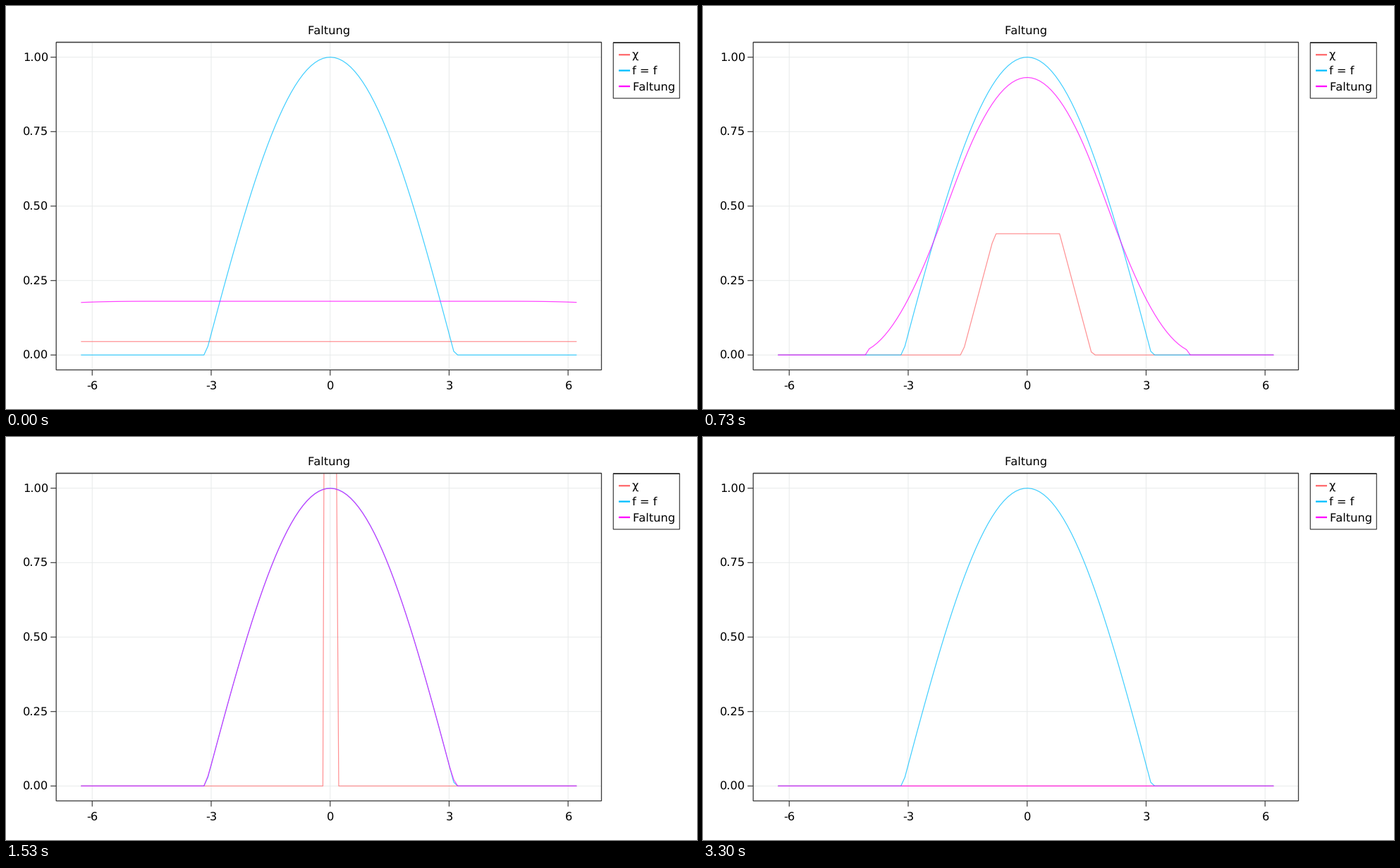
Animation of 980 by 572 pixels, one loop 3360 ms. Source, as a matplotlib script:

```python
import numpy as np
import matplotlib.pyplot as plt
from matplotlib.animation import FuncAnimation
from matplotlib.lines import Line2D

W, H, DPI = 980, 572, 100
LOOP, INTERVAL = 3360, 20
LEFT, RIGHT, TOP, BOTTOM = 71.2, 844.5, 51.5, 516.5
PX = 72 / DPI
RED, BLUE, MAGENTA = (1, 0.42, 0.43), (0, 0.75, 1), (1, 0, 1)
DARK, GRID = "#3c3c3c", "#e8ebeb"

plt.rcParams["font.family"] = "DejaVu Sans"
plt.rcParams["font.size"] = 16.2 * PX
plt.rcParams["text.hinting"] = "none"
plt.rcParams["text.kerning_factor"] = 6

x = -2 * np.pi + 0.1 * np.arange(126)

# Nodes of the 15-point Kronrod rule, on one interval and after one bisection
HALF = np.array([0.2077849550, 0.4058451514, 0.5860872355, 0.7415311856,
                 0.8648644234, 0.9491079123, 0.9914553711])
KRONROD = np.concatenate([-HALF, [0], HALF])
SPLIT = np.concatenate([(KRONROD - 1) / 2, (KRONROD + 1) / 2])


def bump(u):
    return np.where(np.abs(u) < np.pi, np.cos(u / 2), 0)


def bump_twice_integrated(u):
    inner = 2 * u + 2 * np.pi - 4 * np.cos(u / 2)
    return np.where(u < -np.pi, 0, np.where(u > np.pi, 4 * u, inner))


def trapezoid(u, eps):
    return np.clip(2 - np.abs(u) / eps, 0, 1) / (3 * eps)


def sampled(nodes, eps):
    """True where the quadrature over the real line meets a nonzero integrand."""
    y = nodes / (1 - nodes ** 2)
    y = y[np.abs(y) < 2 * eps]
    return (np.abs(x[:, None] - y) < np.pi).any(axis=1)


def convolution(eps):
    g = bump_twice_integrated
    exact = (g(x + 2 * eps) - g(x + eps) - g(x - eps) + g(x - 2 * eps)) / (3 * eps ** 2)
    return np.where(sampled(KRONROD, eps) & sampled(SPLIT, eps), exact, 0)


fig = plt.figure(figsize=(W / DPI, H / DPI), dpi=DPI, facecolor="white")
ax = fig.add_axes([LEFT / W, 1 - BOTTOM / H, (RIGHT - LEFT) / W, (BOTTOM - TOP) / H])
ax.set_xlim(x[0] - 0.625, x[-1] + 0.625)
ax.set_ylim(-0.05, 1.05)
ax.axis("off")


def stroke(xs, ys, color, width, zorder=2):
    """Polyline in stage pixels, measured from the top left."""
    fig.add_artist(Line2D(np.array(xs) / W, 1 - np.array(ys) / H, color=color,
                          linewidth=width * PX, solid_capstyle="butt",
                          solid_joinstyle="miter", snap=False, zorder=zorder))


def box(x0, y0, x1, y1, width):
    stroke([x0, x1, x1, x0, x0, x1], [y0, y0, y1, y1, y0, y0], DARK, width)


def label(px, py, text, ha="left"):
    fig.text(px / W, 1 - py / H, text, ha=ha, va="baseline", color="black")


def x_pixel(v):
    lo, hi = ax.get_xlim()
    return LEFT + (v - lo) / (hi - lo) * (RIGHT - LEFT)


def y_pixel(v):
    lo, hi = ax.get_ylim()
    return BOTTOM - (v - lo) / (hi - lo) * (BOTTOM - TOP)


# Axes frame, grid and labels
for v in (-6, -3, 0, 3, 6):
    px = x_pixel(v)
    stroke([px, px], [TOP, BOTTOM], GRID, 1, zorder=-1)
    stroke([px, px], [BOTTOM, BOTTOM + 8], DARK, 1.2)
    label(px + 0.5, 545, str(v), "center")
for v in (0, 0.25, 0.5, 0.75, 1):
    py = y_pixel(v)
    stroke([LEFT, RIGHT], [py, py], GRID, 1, zorder=-1)
    stroke([LEFT - 8, LEFT], [py, py], DARK, 1.2)
    label(60.6, py + 5.8, f"{v:.2f}", "right")
box(LEFT, TOP, RIGHT, BOTTOM, 1.3)
label(458, 39.5, "Faltung", "center")

# Legend
box(861.3, 52, 955.3, 131, 1.2)
for i, (name, color) in enumerate([("χ", RED), ("f = f", BLUE), ("Faltung", MAGENTA)]):
    row = 69.2 + 22.4 * i
    stroke([869, 885], [row, row], color, 2.3)
    label(888, row + 5.6, name)


def curve(color):
    return ax.plot(x, bump(x), color=color, alpha=0.75, linewidth=1.2 * PX,
                   solid_capstyle="butt", snap=False)[0]


chi_line, f_line, conv_line = curve(RED), curve(BLUE), curve(MAGENTA)


def update(i):
    t = i * INTERVAL + INTERVAL / 2
    step = min(int((t + 4) * 3 / 100), 100)
    eps = np.exp(2 - 0.1 * step)
    chi_line.set_ydata(trapezoid(x, eps))
    conv_line.set_ydata(convolution(eps))
    return chi_line, conv_line


anim = FuncAnimation(fig, update, frames=LOOP // INTERVAL, interval=INTERVAL,
                     repeat=True, repeat_delay=0, blit=False)
plt.show()
```
